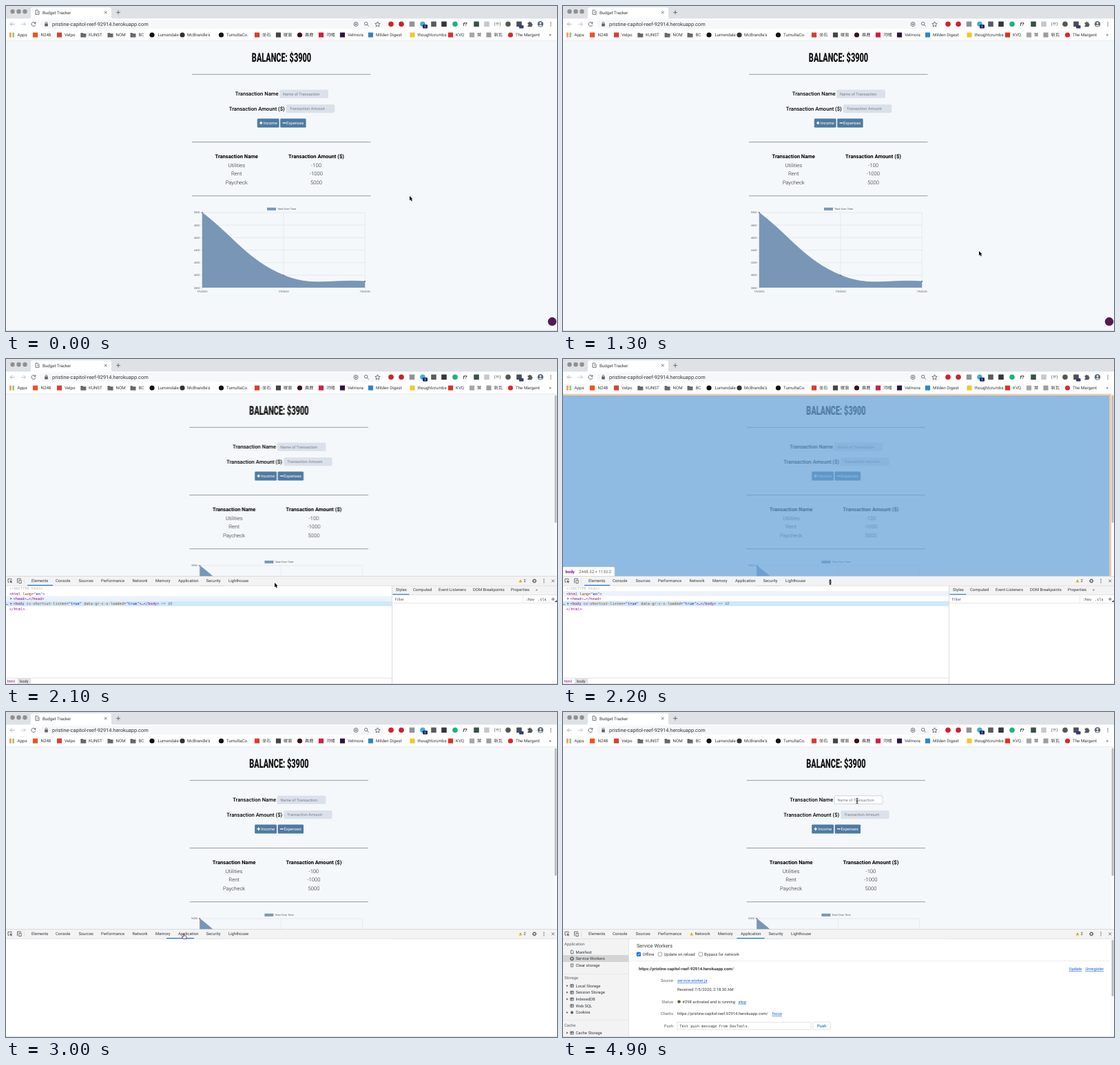
An HTML page that plays this animation: 800 by 472 pixels, repeating every 5000 ms.

```html
<!DOCTYPE html>
<html lang="en">
<head>
<meta charset="utf-8">
<title>Budget Tracker</title>
<style>
html, body { margin: 0; width: 100%; height: 100%; overflow: hidden; background: #f5f8fa; }
svg { display: block; width: 800px; height: 472px; }
text { font-family: Roboto, "Noto Sans CJK TC", "Noto Sans CJK", sans-serif; text-rendering: geometricPrecision; white-space: pre; }
.mono { font-family: "DejaVu Sans Mono", monospace; }
.chart text { font-family: "Liberation Sans", Arial, sans-serif; fill: #555; font-size: 3.9px; }
.ui text { fill: #35383c; }
.ui text.dim { fill: #5f6368; }
.ui text.white { fill: #fff; }
.ui text.link { fill: #1558d6; text-decoration: underline; }
.ui text.ph { fill: #8a8d91; }
.icon { fill: none; stroke: #5f6368; stroke-width: .9; }
.mid { text-anchor: middle; }
.end { text-anchor: end; }
.light { font-weight: 300; fill: #222; }
.bold { font-weight: 700; }
.tag { fill: #881280; } .attr { fill: #994500; } .val { fill: #1a1aa6; }
#page { animation: page 5s step-end -20ms infinite; }
#tabs { animation: tabs 5s step-end -20ms infinite; }
#line { animation: line 5s step-end -20ms infinite; }
@keyframes page { 0% { transform: none; } 36%, 100% { transform: translateX(-3.6px); } }
@keyframes tabs { 0% { transform: none; } 84%, 100% { transform: translateX(8px); } }
@keyframes line {
  0% { x: 31px; width: 37px; }
  60% { x: 233px; width: 40px; }
  62% { x: 244.5px; width: 40px; }
  84%, 100% { x: 252.5px; width: 40px; }
}
</style>
</head>
<body>
<svg id="stage" viewBox="0 0 800 472" xmlns="http://www.w3.org/2000/svg"></svg>
<script>
const LOOP = 5000;

// Times in ms at which each part turns on, off, on ...
const spans = {
  badge: [0, 1800], dev: [1800, LOOP], hoverHead: [2100, 2200], hoverHtml: [2200, 2300],
  overlay: [2200, 2400], blank: [3000, LOOP], app: [3100, LOOP],
  rowBlue: [0, 4000], rowGrey: [4000, LOOP], checked: [4100, LOOP], warn: [4200, LOOP],
  focus: [4900, LOOP],
  arrow: [0, 2200, 2400, 2800, 3100, 4700], resize: [2200, 2400],
  hand: [2800, 3100], beam: [4700, LOOP]
};

// Pointer stops: time, x, y
const stops = [
  [0, 586, 276], [300, 591, 318], [400, 591, 318], [1000, 603, 355], [1300, 604, 356],
  [1600, 590, 375], [1800, 500, 372], [2000, 398, 348], [2100, 390, 325], [2200, 388, 324],
  [2600, 330, 323], [2900, 258, 322], [3000, 258, 322], [3300, 200, 345], [3600, 130, 354],
  [3800, 121, 352], [4100, 121, 352], [4300, 180, 310], [4600, 380, 165], [4800, 425, 130],
  [4900, 427, 129], [LOOP, 427, 129]
];

const pct = ms => ms / LOOP * 100 + '%';
let css = '';
for (const [id, times] of Object.entries(spans)) {
  const keys = times.map((ms, i) => `${pct(ms)}{opacity:${1 - i % 2}}`).join('');
  css += `@keyframes ${id}{0%{opacity:0}${keys}}#${id}{animation:${id} 5s step-end -20ms infinite}`;
}
const path = stops.map(([ms, x, y], i) => {
  const n = i < stops.length - 1 ? (stops[i + 1][0] - ms) / 100 : 1;
  return `${pct(ms)}{transform:translate(${x}px,${y}px);animation-timing-function:steps(${n})}`;
}).join('');
css += `@keyframes pointer{${path}}#pointer{animation:pointer 5s -20ms infinite}`;
document.head.appendChild(document.createElement('style')).textContent = css;

const text = (x, y, size, s, cls = '', more = '') =>
  `<text x="${x}" y="${y}" font-size="${size}" class="${cls}" ${more}>${s}</text>`;
const rect = (x, y, w, h, fill, more = '') =>
  `<rect x="${x}" y="${y}" width="${w}" height="${h}" fill="${fill}" ${more}/>`;
const disc = (x, y, r, fill, more = '') => `<circle cx="${x}" cy="${y}" r="${r}" fill="${fill}" ${more}/>`;
const icon = (d, more = '') => `<path class="icon" d="${d}" ${more}/>`;
const shape = (d, fill, more = '') => `<path d="${d}" fill="${fill}" ${more}/>`;
const group = (id, ...parts) => `<g id="${id}">${parts.join('')}</g>`;
const mark = (kind, x, y, fill, r = 3.6) =>
  kind === 'o' ? disc(x, y, r, fill) : rect(x - r, y - r, 2 * r, 2 * r, fill, 'rx=".5"');
const dots = (x, y) => [-2.4, 0, 2.4].map(d => disc(x, y + d, .75, '#5f6368')).join('');
const warning = (x, y) => shape(`M${x} ${y - 2.3}l2.6 4.6h-5.2z`, '#e8b931') + rect(x - .25, y - .8, .5, 1.6, '#5d4a10');
const gear = (x, y, color) => `<circle cx="${x}" cy="${y}" r="1.9" fill="none" stroke="${color}" stroke-width="1.3"/>` +
  `<circle cx="${x}" cy="${y}" r="2.8" fill="none" stroke="${color}" stroke-width=".8" stroke-dasharray="1.1 1.1"/>`;

function browser() {
  const extensions = [
    ['o', 559, '#d3202d'], ['o', 574, '#c9222f'], ['s', 589.5, '#8f9397'], ['o', 605, '#45acd9'],
    ['s', 621, '#595c60'], ['s', 636, '#34373b'], ['o', 652, '#16b57f'], ['s', 683, '#365347'],
    ['s', 698, '#c6c9cc'], ['o', 729, '#55584f'], ['s', 745, '#4b4e58']
  ];
  const links = [
    ['s', '#f25022', 42.5, 50.5, 'N248'], ['s', '#d93f35', 77.5, 85, 'Velpo'],
    ['f', '', 112.3, 120, 'KUNST'], ['f', '', 151.5, 159.5, 'NOM'], ['f', '', 184.5, 192.5, 'BC'],
    ['o', '#111', 212, 220.5, 'Lumendale'], ['o', '#333', 256, 263, "McBrandle's"],
    ['o', '#111', 312.5, 320, 'TumultaCo.'], ['s', '#df3a30', 364.5, 372, '坐石'],
    ['s', '#444', 395.5, 403, '暖窗'], ['o', '#3a1418', 426.5, 434, '晨鹿'],
    ['s', '#d61c46', 457.5, 465, '河帽'], ['s', '#2c1440', 488.5, 496, 'Velmora'],
    ['s', '#2c86c8', 529.5, 537, 'Milden Digest'], ['s', '#f1c928', 590, 597.5, 'thoughtcrumbs'],
    ['s', '#e02f25', 645.5, 653, 'KVQ'], ['s', '#a5a8ab', 676.5, 684, '葉'],
    ['s', '#9b9ea1', 701, 708.5, '新瓦'], ['o', '#e0252f', 732.5, 740, 'The Margent']
  ];
  let out = rect(0, 0, 800, 18.5, '#dee1e6') + rect(0, 18.5, 800, 32, '#fff') + rect(0, 50.5, 800, .6, '#dcdfe2');
  out += [9.5, 18.5, 27.5].map(x => disc(x, 8, 3.2, '#8e9093')).join('');
  out += shape('M33 18.5Q36 18.5 36 15.5V5Q36 2 39 2H150Q153 2 153 5V15.5Q153 18.5 156 18.5Z', '#fff');
  out += icon('M43 6h3.2l1.8 1.8v4.4h-5zM45 9h2', 'stroke-width=".7"') + text(53, 11.5, 6.2, 'Budget Tracker');
  out += icon('M142.8 7.5l3.6 3.6m0-3.6l-3.6 3.6M160 9.3h6m-3-3v6');
  out += icon('M12.5 26.4h-6.4m3-3l-3 3 3 3', 'style="stroke:#a9acb0"') + icon('M22 26.4h6.4m-3-3l3 3-3 3', 'style="stroke:#bfc2c5"');
  out += icon('M42.4 24.6A3 3 0 1 0 42.9 27.2') + shape('M43.3 22.8v2.9h-2.9z', '#5f6368');
  out += rect(49, 20, 499, 13, '#f6f7f8', 'rx="6.5"');
  out += rect(56.2, 25.6, 4.6, 3.8, '#5f6368', 'rx=".5"') + icon('M57.2 26v-1.4a1.3 1.3 0 0 1 2.6 0v1.4', 'stroke-width=".7"');
  out += text(67, 29, 7.4, 'pristine-capitol-reef-92914.herokuapp.com');
  out += icon('M505 26.4a3 3 0 1 0 6 0a3 3 0 1 0-6 0M506.5 26.4h3m-1.5-1.5v3') +
    icon('M520.5 25.6a2.2 2.2 0 1 0 4.4 0a2.2 2.2 0 1 0-4.4 0M524.4 27.2l2.4 2.4') +
    icon('M539.5 22.8l1.1 2.4 2.6.3-1.9 1.8.5 2.6-2.3-1.3-2.3 1.3.5-2.6-1.9-1.8 2.6-.3z', 'stroke-width=".8"');
  out += extensions.map(([kind, x, fill]) => mark(kind, x, 26.2, fill, 3.8)).join('');
  out += rect(605, 27, 7, 5.5, '#17245c', 'rx="1"') + text(608.5, 31.4, 4.4, '2', 'white mid');
  out += rect(745, 28, 6.5, 4.5, '#343b78', 'rx="1"');
  out += text(663.5, 28.7, 7, 'f?', 'bold', 'font-style="italic"') + text(713.5, 28.4, 6, '(≡)', 'mid');
  out += shape('M757.5 24h1.8a1.2 1.2 0 0 1 2.4 0h1.8v2a1.2 1.2 0 0 1 0 2.4v1.8h-6v-2a1.1 1.1 0 0 0 0-2.2z', '#55595e');
  out += disc(776, 26.2, 4.2, '#5c6a78') + disc(776, 25, 1.4, '#e8eaed') + shape('M773.4 28.8q2.6-3 5.2 0q-2.6 1.8-5.2 0z', '#e8eaed');
  out += dots(791, 26.3);
  const hues = ['#ea4335', '#fbbc04', '#34a853', '#4285f4'];
  for (let i = 0; i < 9; i++) out += rect(5.3 + i % 3 * 2.4, 38.8 + (i / 3 | 0) * 2.4, 1.7, 1.7, hues[(i + (i / 3 | 0)) % 4]);
  out += text(16.5, 44.2, 6.2, 'Apps');
  for (const [kind, fill, ix, tx, name] of links) {
    out += kind === 'f' ? shape(`M${ix - 4} 39h3l1 1h4v5.4h-8z`, '#65696e') : mark(kind, ix, 42, fill);
    out += text(tx, 44.2, 6.2, name);
  }
  return out + text(788.5, 44, 7, '»');
}

function chart() {
  const left = 284.8, mid = 403, right = 521.2, top = 300, base = 409.1;
  let out = '';
  for (let i = 0; i < 7; i++) {
    const y = top + i * (base - top) / 6;
    out += shape(`M${left - 3} ${y}H${right}`, 'none', 'stroke="#000" stroke-opacity=".12" stroke-width=".5"');
    out += text(281.5, y + 1.4, 3.9, 5000 - 200 * i, 'end');
  }
  for (const x of [left, mid, right]) {
    out += shape(`M${x} ${top}V${base + 3}`, 'none', 'stroke="#000" stroke-opacity=".12" stroke-width=".5"');
    out += text(x, 416.2, 3.9, '7/5/2020', 'mid');
  }
  const curve = `M${left} ${top}C332.1 336.4 350.3 368.7 ${mid} 391C444.8 408.7 473.9 396.4 ${right} 400`;
  out += shape(`${curve}V${base}H${left}Z`, '#7996b7') + shape(curve, 'none', 'stroke="#7491b4" stroke-width=".8"');
  out += disc(left, top, 1.1, '#5f7fa5') + disc(mid, 391, 1.1, '#5f7fa5') + disc(right, 400, 1.1, '#5f7fa5');
  out += rect(379, 292.8, 13, 4, '#7996b7') + text(394, 296.2, 3.9, 'Total Over Time');
  return `<g class="chart">${out}</g>`;
}

function page() {
  const rule = y => rect(270, y - .4, 259.5, .9, '#8d9194');
  const rows = [['Utilities', -100], ['Rent', -1000], ['Paycheck', 5000]];
  return group('page',
    `<text transform="translate(400 81.1) scale(.605 1)" font-size="18" font-weight="900" class="mid" fill="#111">BALANCE: $3900</text>`,
    rule(99.2), rule(197.6), rule(275.7),
    text(395.6, 130, 7.65, 'Transaction Name', 'end', 'font-weight="500"'),
    text(404.8, 151.5, 7.65, 'Transaction Amount ($)', 'end', 'font-weight="500"'),
    rect(397.3, 121.5, 70.7, 12.2, '#dae1eb', 'rx="2"'), rect(406.8, 143, 70.4, 12.2, '#dae1eb', 'rx="2"'),
    group('focus', rect(397.5, 121.7, 70.3, 11.8, '#fff', 'rx="2" stroke="#c3cbd6" stroke-width=".7"')),
    text(402, 129.7, 5.75, 'Name of Transaction', '', 'fill="#7c8188"'),
    text(411.8, 151.1, 5.65, 'Transaction Amount', '', 'fill="#7c8188"'),
    rect(364.8, 163.4, 31.8, 13.2, '#4d7ba2', 'rx="1.4"'), rect(398.2, 163.4, 37.4, 13.2, '#4d7ba2', 'rx="1.4"'),
    shape('M368 169.9h4.6m-2.3-2.3v4.6M401.6 169.9h4.8', 'none', 'stroke="#fff" stroke-width="1.3"'),
    text(373.9, 172.1, 5.95, 'Income', '', 'fill="#fff"'), text(407, 172.1, 5.95, 'Expenses', '', 'fill="#fff"'),
    text(334.7, 220.8, 7.6, 'Transaction Name', 'mid bold'),
    text(450.5, 220.8, 7.6, 'Transaction Amount ($)', 'mid bold'),
    ...rows.map(([name, sum], i) => text(334.7, 233.5 + 12.6 * i, 7.65, name, 'mid light') +
      text(450.5, 233.5 + 12.6 * i, 7.65, sum, 'mid light')),
    chart());
}

function overlay() {
  return group('overlay',
    rect(0, 52.8, 793.5, 263, '#69a3d8', 'fill-opacity=".72"'),
    shape('M0 51H796V316H793.5V52.8H0Z', '#f6b26b', 'fill-opacity=".66"'),
    rect(-2, 302, 77, 13.8, '#fff', 'rx="1.5" stroke="#c5c9ce" stroke-width=".5"'),
    text(3.5, 311.2, 6.1, '<tspan class="tag bold">body</tspan>'),
    text(23, 311.2, 6.1, '2448.52 × 1130.2', 'dim'));
}

function toolbar() {
  const tabs = list => list.map(([x, s]) => text(x, 324.4, 5.9, s)).join('');
  return rect(0, 315.5, 800, 13.7, '#f3f3f3') + rect(0, 315.3, 800, .6, '#c8cacc') + rect(0, 328.9, 800, .5, '#cccdcf') +
    icon('M8 321v-1.8h-5v5h2', 'stroke-width=".8"') + shape('M5.5 321.3l4 1.5-1.6.8 1.2 1.4-.8.6-1.1-1.4-.8 1.3z', '#5f6368') +
    icon('M16.5 325.3v-6.3h5v1.2M18.8 321.3h3.4v4.4h-3.4z', 'stroke-width=".8"') + rect(26.5, 318.5, .5, 8, '#ccc') +
    tabs([[37, 'Elements'], [72, 'Console'], [105.5, 'Sources'], [138, 'Performance']]) +
    group('tabs', tabs([[183.5, 'Network'], [217, 'Memory'], [250, 'Application'], [290.5, 'Security'], [323, 'Lighthouse']])) +
    group('warn', warning(186.8, 322.3)) +
    '<rect id="line" y="328" height="1.2" fill="#1a73e8"/>' +
    warning(747, 322.2) + text(751.6, 324.3, 5.9, '2') + gear(767.2, 322.3, '#5f6368') + dots(781, 322.3) +
    icon('M792.3 320.4l3.8 3.8m0-3.8l-3.8 3.8');
}

function elements() {
  const code = (x, y, s) => text(x, y, 5.33, s, 'mono tag', 'style="fill:#881280"');
  const attr = (name, value) => `<tspan class="attr">${name}</tspan>="<tspan class="val">${value}</tspan>"`;
  const fold = y => shape(`M6.3 ${y - 1.6}l2.6 1.6-2.6 1.6z`, '#6e6e6e');
  const panes = [[566, 'Styles'], [591, 'Computed'], [628, 'Event Listeners'], [678, 'DOM Breakpoints'], [733, 'Properties'], [769, '»']];
  return rect(0, 329.3, 800, 143, '#fff') +
    group('hoverHead', rect(0, 344.4, 560, 7.3, '#ebf2fc')) + group('hoverHtml', rect(0, 337.1, 560, 7.3, '#ebf2fc')) +
    rect(0, 351.7, 560, 7.3, '#cfe8fc') +
    text(5, 335.4, 5.33, '&lt;!DOCTYPE html&gt;', 'mono', 'style="fill:#b5b5b5"') +
    code(5, 342.6, `&lt;html ${attr('lang', 'en')}&gt;`) +
    fold(348) + code(10.5, 349.9, '&lt;head&gt;…&lt;/head&gt;') +
    text(0, 356.6, 5.33, '…', 'mono') + fold(355.3) +
    code(10.5, 357.2, `&lt;body ${attr('cz-shortcut-listen', 'true')} ${attr('data-gr-c-s-loaded', 'true')}&gt;…&lt;/body&gt;` +
      '<tspan fill="#777"> == <tspan font-style="italic">$0</tspan></tspan>') +
    code(5, 364.5, '&lt;/html&gt;') +
    rect(0, 463, 560.5, .5, '#ccc') + rect(16.8, 463.5, 19.5, 9, '#e2e2e2') +
    text(1.5, 470.4, 5.8, 'html', '', 'style="fill:#881280"') + text(20, 470.4, 5.8, 'body') +
    rect(560.5, 329.3, 240, 13, '#f3f3f3') + rect(560.5, 342, 240, .5, '#ccc') + rect(560.3, 329.3, .6, 143, '#c4c6c8') +
    panes.map(([x, s]) => text(x, 337.4, 5.9, s)).join('') + rect(561.5, 341.3, 24, 1.1, '#1a73e8') +
    text(564.8, 350.6, 5.8, 'Filter', 'dim') + rect(750, 343, .5, 11, '#ddd') +
    text(754.5, 350.6, 5.33, ':hov', 'mono') + text(772, 350.6, 5.33, '.cls', 'mono') +
    icon('M791.8 348.8h5m-2.5-2.5v5', 'stroke-width=".8"') + shape('M799.6 350v3h-3z', '#333') +
    rect(560.5, 354.3, 240, .5, '#ccc');
}

function application() {
  const items = [[350.5, 'Manifest'], [370, 'Clear storage'], [399.6, 'Local Storage', 1], [409.3, 'Session Storage', 1],
    [419, 'IndexedDB', 1], [428.7, 'Web SQL'], [438.4, 'Cookies', 1], [468, 'Cache Storage', 1]];
  const glyph = (y, s) => s === 'Cookies' ? disc(13, y - 2, 2.1, '#5f6368') :
    s === 'Manifest' ? icon(`M11.5 ${y - 4.4}h2.2l1.3 1.3v3.5h-3.5z`, 'stroke-width=".7"') :
    s === 'Clear storage' ? icon(`M10.8 ${y - 4}h4.4M11.5 ${y - 4}v4h3v-4`, 'stroke-width=".8"') :
    icon(`M10.8 ${y - 4}h4.4v4h-4.4zM10.8 ${y - 2.5}h4.4M12.6 ${y - 4}v4`, 'stroke-width=".6"');
  const row = (fill, cls, ink) => rect(0, 353, 95, 10, fill) + gear(13, 358.2, ink) + text(18.5, 360.4, 5.9, 'Service Workers', cls);
  const box = x => rect(x, 349.1, 5.4, 5.4, '#fff', 'rx=".8" stroke="#767676" stroke-width=".6"');
  const label = (y, s) => text(160, y, 5.9, s, 'end dim');
  const link = (x, y, s) => text(x, y, 5.85, s, 'link');
  const site = 'https://pristine-capitol-reef-92914.herokuapp.com/';
  return rect(0, 329.3, 95, 143, '#f3f3f3') + rect(95, 329.3, .5, 143, '#ccc') +
    rect(0, 380, 95, .4, '#dcdcdc') + rect(0, 447.5, 95, .4, '#dcdcdc') +
    [[339.4, 'Application'], [388.2, 'Storage'], [457, 'Cache']].map(([y, s]) => text(2, y, 5.9, s, 'dim')).join('') +
    items.map(([y, s, fold]) => glyph(y, s) + text(18.5, y, 5.9, s) +
      (fold ? shape(`M5 ${y - 3.7}l2.6 1.7-2.6 1.7z`, '#6e6e6e') : '')).join('') +
    group('rowBlue', row('#1a73e8', 'white', '#fff')) + group('rowGrey', row('#d3d4d5', '', '#5f6368')) +
    text(107, 341.6, 7.25, 'Service Workers') +
    box(107.2) + box(138.2) + box(197.2) +
    group('checked', rect(106.9, 348.8, 6, 6, '#1a73e8', 'rx=".9"'),
      shape('M108.2 351.9l1.3 1.3 2.3-2.8', 'none', 'stroke="#fff" stroke-width=".9"')) +
    text(115.5, 354, 5.9, 'Offline') + text(146.5, 354, 5.95, 'Update on reload') + text(205, 354, 5.95, 'Bypass for network') +
    rect(95.5, 361.3, 700, .5, '#dadada') +
    text(110, 375, 5.95, site, '', 'font-weight="600"') + link(734.6, 375, 'Update') + link(758.4, 375, 'Unregister') +
    label(392, 'Source') + link(166, 392, 'service-worker.js') +
    text(166, 405.3, 5.85, 'Received 7/5/2020, 2:18:30 AM') +
    label(422.8, 'Status') + disc(168.5, 420.7, 2.3, '#566b35') +
    text(173.3, 422.8, 5.85, '#298 activated and is running') + link(254.5, 422.8, 'stop') +
    label(440.3, 'Clients') + text(166, 440.3, 5.85, site) + link(303.4, 440.3, 'focus') +
    label(457.8, 'Push') + rect(166, 450.5, 194, 10.7, '#fff', 'stroke="#cfd1d3" stroke-width=".6"') +
    text(169.3, 458, 5.27, 'Test push message from DevTools.', 'mono') +
    rect(362.8, 450.3, 25.8, 11, '#fff', 'rx="1.6" stroke="#cfd1d3" stroke-width=".6"') +
    text(375.7, 458, 5.9, 'Push', 'mid', 'font-weight="500" style="fill:#1a73e8"') +
    rect(795, 329.3, 5, 143, '#fafafa') + rect(796.6, 331, 2.9, 82, '#b9bbbd', 'rx="1.4"');
}

function pointer() {
  return group('pointer',
    group('arrow', shape('M0 0V6.4L1.5 5L2.6 7.6L3.8 7.1L2.7 4.6H4.6Z', '#000', 'stroke="#fff" stroke-width=".9" paint-order="stroke"')),
    group('resize', shape('M0-4.2L1.8-2H.5V-.5H2V.5H.5V2H1.8L0 4.2L-1.8 2H-.5V.5H-2V-.5H-.5V-2H-1.8Z', '#000',
      'stroke="#fff" stroke-width=".7" paint-order="stroke"')),
    group('hand', shape('M-.7.3Q0-.6.7.3V2.7L3.6 3.5Q4.2 3.8 4.1 4.5L3.5 7.5H-.6L-2.6 4.6Q-2.4 3.6-1.5 4.2L-.7 5Z', '#fff',
      'stroke="#000" stroke-width=".6"')),
    group('beam', shape('M-1.6-3.8Q0-3.8 0-2.8V2.8Q0 3.8-1.6 3.8M1.6-3.8Q0-3.8 0-2.8M0 2.8Q0 3.8 1.6 3.8M-1 .8H1', 'none',
      'stroke="#000" stroke-width=".8"')));
}

document.getElementById('stage').innerHTML =
  rect(0, 0, 800, 472, '#f5f8fa') + page() + group('badge', disc(793, 458.3, 6.2, '#531a4f')) +
  `<g class="ui">${browser()}` +
  group('dev',
    rect(795.5, 51, 4.5, 265, '#fafafa') + rect(796.6, 52.5, 2.9, 185.5, '#b9bbbd', 'rx="1.4"'),
    overlay(), elements(),
    group('blank', rect(0, 329.3, 800, 143, '#fff')), group('app', application()), toolbar()) +
  '</g>' + rect(0, 471.2, 800, .8, '#d3d5d7') + pointer();
</script>
</body>
</html>
```
